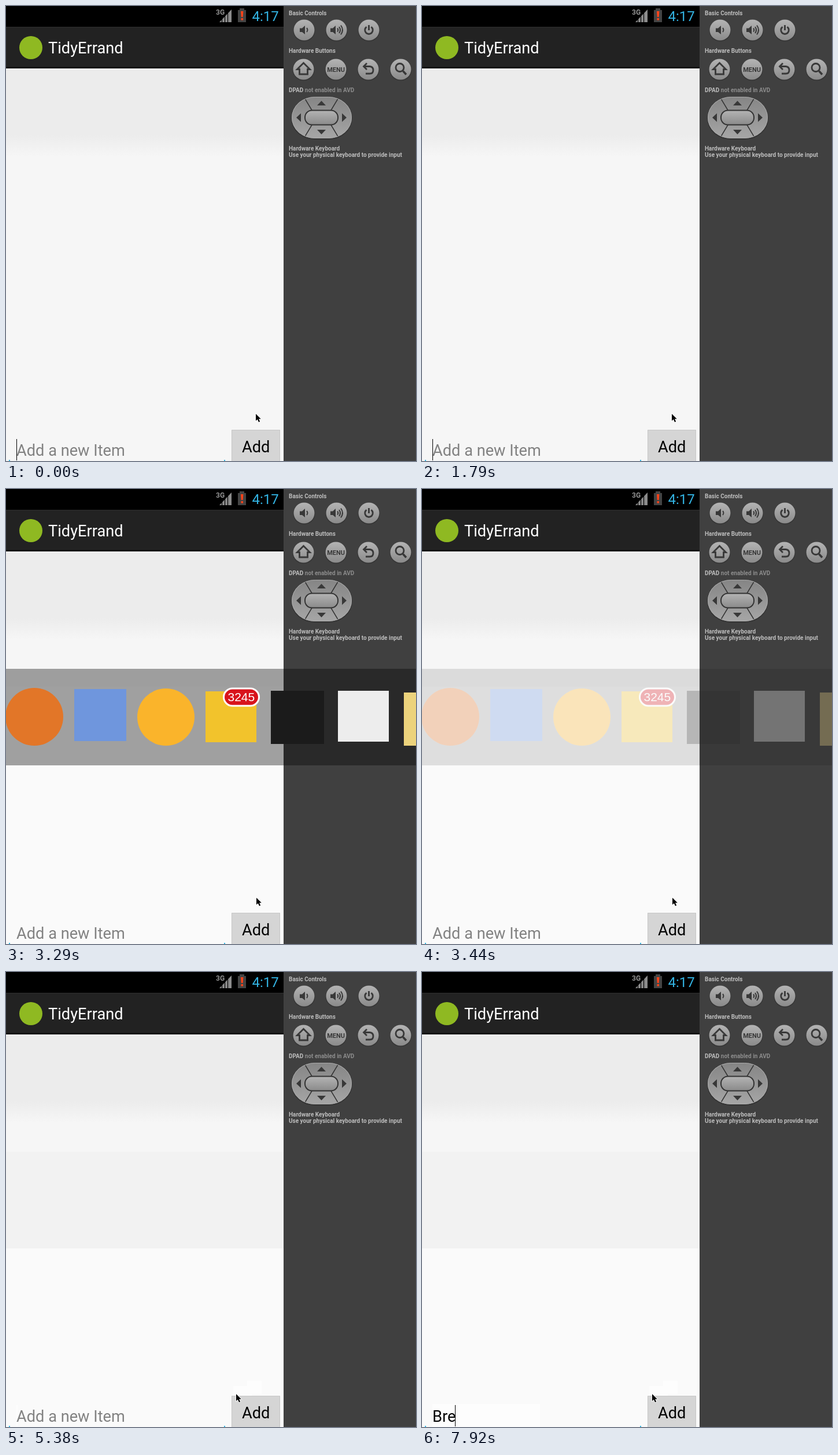
An HTML page that plays this animation: 709 px wide and 787 px high, repeating every 8000 ms.

```html
<!DOCTYPE html>
<html lang="en">
<head>
<meta charset="utf-8">
<title>To-do app in an emulator</title>
<style>
  html, body { margin: 0; width: 100%; height: 100%; overflow: hidden; background: #404040; }
  svg { display: block; width: 709px; height: 787px; font-family: Roboto, sans-serif; }
  .app { font-size: 27.2px; }
  .label { font-size: 10px; font-weight: 700; fill: #bdbdbd; }
  .glyph { fill: none; stroke: #383838; stroke-width: 2.8; }
  .solid { fill: #383838; }
  .arrow { stroke: #fff; stroke-width: 1.6; paint-order: stroke; }
</style>
</head>
<body>
<svg viewBox="0 0 709 787">
  <defs>
    <linearGradient id="page" x2="0" y2="1">
      <stop offset=".17" stop-color="#ececec"/>
      <stop offset=".225" stop-color="#f6f6f6"/>
    </linearGradient>
    <linearGradient id="metal" x2="0" y2="1">
      <stop stop-color="#b4b4b4"/>
      <stop offset="1" stop-color="#8a8a8a"/>
    </linearGradient>
    <linearGradient id="pad" x2="0" y2="1">
      <stop stop-color="#858585"/>
      <stop offset="1" stop-color="#a6a6a6"/>
    </linearGradient>
    <clipPath id="padShape"><rect x="494" y="157" width="104" height="72" rx="40" ry="36"/></clipPath>
    <path id="arrow" class="arrow" d="M0 0V12L2.8 9.4 5 14.3 7.2 13.3 5 8.7H8.8Z"/>
    <path id="hand" fill="#fff" stroke="#000" stroke-width="1.2" stroke-linejoin="round"
      d="M4 10V2.2Q5 .3 6.3 2.2V6.5Q7.5 5 8.8 6.7Q10 5.6 11.3 7.2Q13.7 6.6 14 9V11.5L12.5 14.5V16.5H5.5V15L1 9.6Q1 7.6 3 8.8ZM7.5 11V14M9.5 11V14M11.5 11V14"/>
  </defs>

  <!-- App screen -->
  <rect y="108" width="480" height="679" fill="url(#page)"/>
  <rect data-from="1940" data-to="3290" y="478" width="480" height="246" fill="#fafafa"/>
  <rect data-from="3290" y="342" width="480" height="445" fill="#fafafa"/>
  <rect data-from="3580" y="311" width="480" height="167" fill="#f2f2f2"/>
  <g fill="#fdfdfd">
    <rect data-from="4030" x="417" y="707" width="25" height="23"/>
    <rect data-from="4180" x="393" y="716" width="32" height="34"/>
    <rect data-from="4780" x="18" y="749" width="2" height="37"/>
    <rect data-from="7470" x="18" y="747" width="186" height="40"/>
  </g>

  <rect width="480" height="37"/>
  <rect y="37" width="480" height="71" fill="#222"/>
  <path d="M0 36.5H480" stroke="#303030"/>
  <rect y="105" width="480" height="3" fill="#151515"/>
  <text x="363" y="15" font-size="12" font-weight="700" fill="#929292">3G</text>
  <path d="M369 28L390 6V28Z" fill="#8c8c8c"/>
  <path d="M373.5 20V28M378.5 16V28M383.5 11V28" stroke="#000" stroke-width="1.2"/>
  <path d="M401 7H404V4H412V7H415V28H401Z" fill="#444"/>
  <path d="M406 9H410.4L409.6 19H406.8ZM406.5 21H410V24.5H406.5Z" fill="#ff4319"/>
  <text x="425.5" y="26" font-size="24" fill="#33b5e5">4:17</text>
  <circle cx="43" cy="72" r="20" fill="#8fb922"/>
  <text class="app" x="73" y="82" fill="#fff">TidyErrand</text>

  <path d="M5 786H7M377 786H379" stroke="#33b5e5" stroke-width="2"/>
  <rect x="390" y="733" width="84" height="54" fill="#d5d5d5"/>
  <path d="M390.5 787V733.5H473.5V787" fill="none" stroke="#c6c6c6"/>
  <text class="app" x="408" y="772">Add</text>
  <text class="app" data-to="7470" x="18" y="778" fill="#828282">Add a new Item</text>
  <text class="app" id="entry" x="18" y="778"></text>
  <rect id="caret" y="749" width="1" height="37"/>

  <!-- Emulator controls -->
  <rect x="480" width="229" height="787" fill="#404040"/>
  <g class="label">
    <text x="489" y="16">Basic Controls</text>
    <text x="489" y="81">Hardware Buttons</text>
    <text x="489" y="149">DPAD <tspan fill="#8c8c8c">not enabled in AVD</tspan></text>
    <text x="489" y="250">Hardware Keyboard</text>
    <text x="489" y="261">Use your physical keyboard to provide input</text>
  </g>
  <g id="buttons"></g>
  <g class="solid">
    <path d="M508 38.5H512L517 34V49L512 45H508Z"/>
    <path d="M561 38.5H565L570 34V49L565 45H561Z"/>
    <text x="555.2" y="113.8" font-size="11" font-weight="700">MENU</text>
  </g>
  <g class="glyph">
    <path stroke-width="2" d="M520 38Q523 41.5 520 45M573 38.5Q575.5 41.5 573 44.5M576 36Q580 41.5 576 47M579 33.5Q585 41.5 579 49.5"/>
    <path d="M623.5 36.2A6.8 6.8 0 1 0 631.5 36.2M627.5 33V42"/>
    <path d="M503.5 109.5L514.5 98.5 525.5 109.5H521.5V118H507.5V109.5Z"/>
    <path d="M624 99L618.5 104.5 624 110M619 104.5H629Q635 105 635 111 635 117 629 117H622"/>
    <path d="M686.5 112.5L692 118.5" stroke-width="3.5"/>
    <circle cx="681" cy="106.5" r="7"/>
  </g>

  <rect x="493" y="157" width="106" height="74" rx="41" ry="37" fill="#343434"/>
  <g clip-path="url(#padShape)">
    <rect x="494" y="157" width="104" height="72" fill="url(#pad)"/>
    <path d="M515 157L530 182M576 157L561 182M515 229L530 204M576 229L561 204" stroke="#333" stroke-width="1.5"/>
  </g>
  <rect x="494.5" y="157.5" width="103" height="71" rx="40" ry="35.5" fill="none" stroke="#aaa"/>
  <rect x="517" y="180.5" width="57" height="25" rx="12" fill="url(#metal)" stroke="#333" stroke-width="2"/>
  <path class="solid" d="M538 172H553L545.5 164ZM538 214H553L545.5 222ZM502 193L510 185.5V200.5ZM589 193L581 185.5V200.5Z"/>

  <!-- App switcher -->
  <g id="switcher" data-from="1940" data-to="3580">
    <rect y="311" width="709" height="167" fill-opacity=".36"/>
    <circle cx="49" cy="394" r="50" fill="#e27628"/>
    <rect x="118" y="346" width="90" height="90" fill="#6f96dd"/>
    <circle cx="276.5" cy="394.5" r="49.5" fill="#fab42b"/>
    <rect x="345" y="350" width="88" height="88" fill="#f2c32c"/>
    <rect x="376.5" y="345" width="61" height="30" rx="15" fill="#d8141c" stroke="#fff" stroke-width="3"/>
    <text x="383.5" y="367" font-size="21" fill="#fff" font-family="Liberation Sans, sans-serif">3245</text>
    <rect x="458" y="349" width="92" height="92" fill="#1b1b1b"/>
    <rect x="574" y="349" width="88" height="88" fill="#ededed"/>
    <rect x="688" y="352" width="92" height="92" fill="#ecd37c"/>
  </g>

  <!-- Pointer -->
  <use href="#arrow" data-to="1940" x="432" y="705.5"/>
  <use href="#hand" data-from="1940" data-to="3290" x="427" y="706"/>
  <use href="#arrow" data-from="3290" data-to="4030" x="433" y="707"/>
  <use href="#arrow" data-from="4030" data-to="4180" x="417" y="716"/>
  <use href="#hand" data-from="4180" data-to="5380" x="393" y="731"/>
  <use href="#arrow" data-from="5380" x="398" y="730"/>
</svg>
<script>
const LOOP = 8000;
const CARET_TOGGLES = [300, 750, 1350, 1790, 2240, 2840, 3290, 3880, 4780, 7470];
const KEY_TIMES = [7470, 7770, 7920];
const WORD = 'Bre';
const $ = id => document.getElementById(id);
const timed = [...document.querySelectorAll('[data-from], [data-to]')];
const passed = (times, t) => times.filter(time => time <= t).length;

const buttonRow = (y, xs) => xs.map(x =>
  `<circle cx="${x}" cy="${y + 1}" r="19" fill="#363636"/>
   <circle cx="${x}" cy="${y}" r="18" fill="url(#metal)"/>`).join('');
$('buttons').innerHTML =
  buttonRow(41.5, [515.5, 571.5, 627.5]) +
  buttonRow(109.5, [514.5, 570.5, 626.5, 682.5]);

function draw(t) {
  for (const el of timed) {
    const { from = 0, to = LOOP } = el.dataset;
    el.style.display = t >= from && t < to ? '' : 'none';
  }
  $('switcher').style.opacity = t < 3440 ? 1 : 0.3;

  const typed = WORD.slice(0, passed(KEY_TIMES, t));
  $('entry').textContent = typed;
  const width = typed ? $('entry').getComputedTextLength() : 0;
  $('caret').setAttribute('x', typed ? Math.round(17 + width) : 18);
  $('caret').style.display = passed(CARET_TOGGLES, t) % 2 ? 'none' : '';
}

const start = performance.now();
function tick() {
  draw((performance.now() - start) % LOOP);
  requestAnimationFrame(tick);
}
tick();
</script>
</body>
</html>
```
